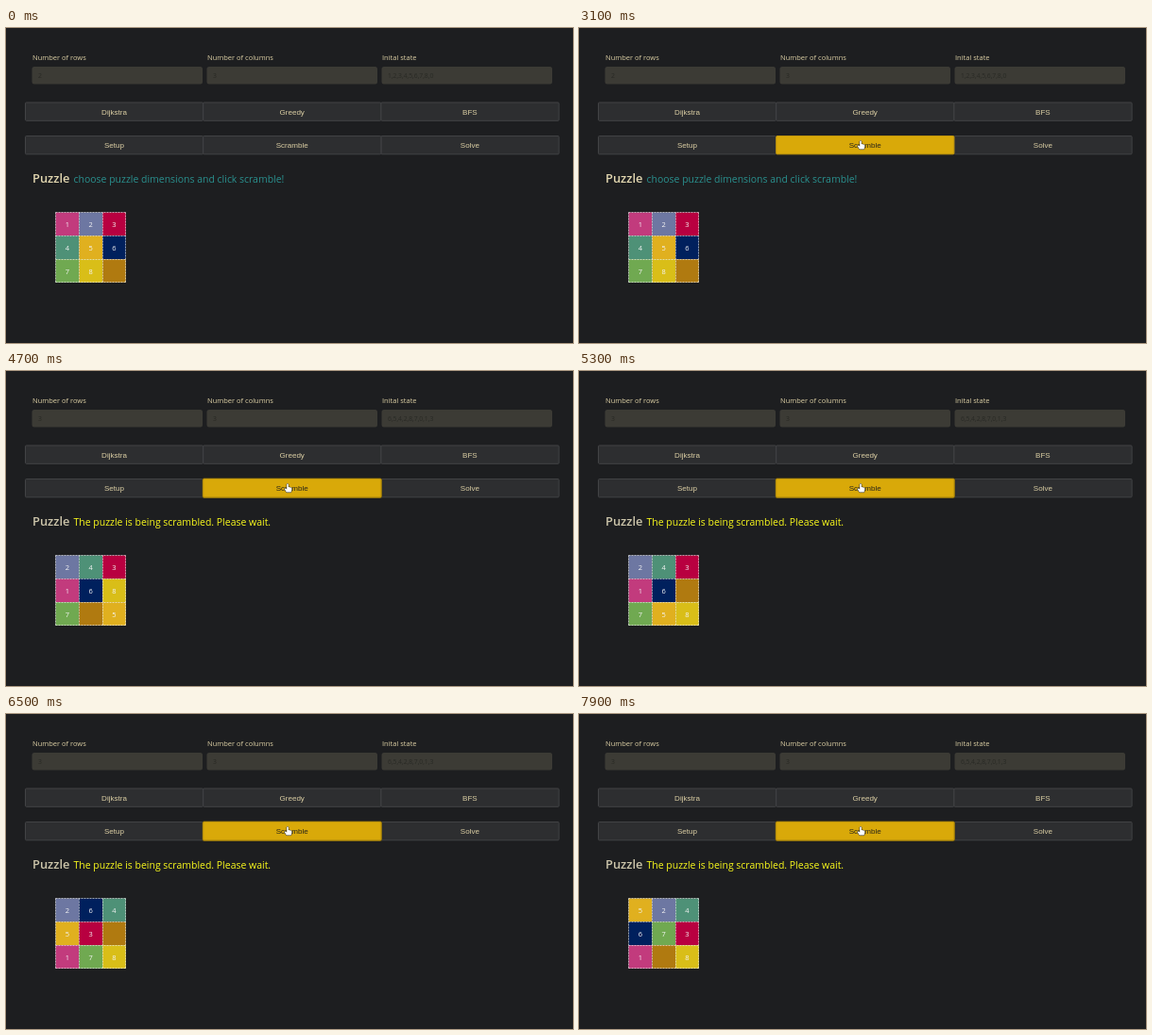
Recreate the animation shown at these times as an HTML page with a canvas. Size 600x334 px, loop 8000 ms.

```html
<!DOCTYPE html>
<html>
<head>
<meta charset="utf-8">
<style>
html, body { margin: 0; width: 600px; height: 334px; overflow: hidden; background: #1d1e20; }
canvas { display: block; }
</style>
</head>
<body>
<canvas id="stage" width="600" height="334"></canvas>
<script>
const ctx = document.getElementById('stage').getContext('2d');
const LOOP = 8000, CLICK = 3300, FIRST_MOVE = 3450, MOVE_GAP = 148;
const SANS = '"Open Sans", "Noto Sans", sans-serif';
const ARIAL = '"Liberation Sans", Arial, sans-serif';
const CREAM = '#dccfa4';

// Index 0 is the gap
const COLORS = ['#b07a10', '#c23b7d', '#6d77a2', '#b80040', '#4e9177',
                '#e0b01f', '#00205d', '#70a951', '#d9be18'];
// Directions the gap travels
const MOVES = 'LULURDRDL' + 'RUDUULD' + 'DLURR' + 'LDULR' + 'ULDRD';
const STEP = { L: -1, R: 1, U: -3, D: 3 };
// Pointer stops: time, x, y
const PATH = [[1250, 531, 338], [1400, 526, 327], [1800, 505, 307], [2600, 298, 119]];

function text(str, x, y, size, color, family = SANS, align = 'left', weight = 400) {
  ctx.font = `${weight} ${size}px ${family}`;
  ctx.textAlign = align;
  ctx.fillStyle = color;
  ctx.fillText(str, x, y);
}

function box(x, y, w, h, r, fill, stroke) {
  ctx.beginPath();
  ctx.roundRect(x, y, w, h, r);
  ctx.fillStyle = fill;
  ctx.fill();
  if (stroke) {
    ctx.strokeStyle = stroke;
    ctx.lineWidth = 1;
    ctx.stroke();
  }
}

function field(x, label, value) {
  text(label, x, 34, 7.5, CREAM);
  box(x - 0.5, 41, 180.5, 18.5, 2.5, '#3c3b35');
  text(value, x + 6, 53, 6.8, '#292a25');
}

function button(col, y, label, hover, focus) {
  const x = 20.5 + col * 188.2;
  if (focus) box(x - 1, y - 1, 190.2, 21.5, 2, '#77600f');
  box(x, y, 188.2, 19.3, 1, hover ? '#d9a909' : '#2d2e30', hover ? '#c1960c' : '#424345');
  text(label, x + 94, y + 12.5, 8.05, hover ? '#29251a' : CREAM, ARIAL, 'center');
}

function boardAt(t) {
  const board = [1, 2, 3, 4, 5, 6, 7, 8, 0];
  const count = Math.max(0, Math.floor((t - FIRST_MOVE) / MOVE_GAP) + 1);
  let gap = 8;
  for (const move of MOVES.slice(0, count)) {
    const next = gap + STEP[move];
    board[gap] = board[next];
    board[next] = 0;
    gap = next;
  }
  return board;
}

function drawBoard(board) {
  const size = 24.8;
  board.forEach((n, i) => {
    const x = 52.5 + i % 3 * size, y = 195.5 + Math.floor(i / 3) * size;
    ctx.fillStyle = COLORS[n];
    ctx.fillRect(x, y, size, size);
    if (n) text(n, x + 12.4, y + 15.6, 7.5, '#f4f4f4', SANS, 'center');
  });
  ctx.strokeStyle = 'rgba(255,255,255,.75)';
  ctx.lineWidth = 0.8;
  ctx.setLineDash([2, 1]);
  ctx.beginPath();
  for (let i = 0; i < 4; i++) {
    const d = Math.round(i * size);
    ctx.moveTo(52.5 + d, 195.5);
    ctx.lineTo(52.5 + d, 269.5);
    ctx.moveTo(52.5, 195.5 + d);
    ctx.lineTo(126.5, 195.5 + d);
  }
  ctx.stroke();
  ctx.setLineDash([]);
}

function pointerAt(t) {
  if (t < PATH[0][0]) return null;
  for (let i = 1; i < PATH.length; i++) {
    const [t0, x0, y0] = PATH[i - 1], [t1, x1, y1] = PATH[i];
    if (t < t1) {
      const k = (t - t0) / (t1 - t0);
      return [x0 + (x1 - x0) * k, y0 + (y1 - y0) * k];
    }
  }
  return PATH[PATH.length - 1].slice(1);
}

const ARROW = new Path2D('M0 0V7.2L1.7 5.7 2.8 8.2 4 7.7 2.9 5.2H5.2Z');
const HAND = new Path2D('M-.8 1Q0-.4.8 1V4L3.6 4.6Q4.6 5 4.4 6.4L3.7 9.6H-1.2L-3.3 6.2Q-3.2 5-2 5.6L-.8 6.6Z');

function drawPointer([x, y], hand) {
  const shape = hand ? HAND : ARROW;
  ctx.save();
  ctx.translate(x, y);
  ctx.strokeStyle = '#1b1b1b';
  ctx.lineWidth = 1;
  ctx.stroke(shape);
  ctx.fillStyle = '#fff';
  ctx.fill(shape);
  ctx.restore();
}

function draw(t) {
  const busy = t >= CLICK;
  const pointer = pointerAt(t);
  const hover = pointer !== null && pointer[1] < 134;

  ctx.fillStyle = '#1d1e20';
  ctx.fillRect(0, 0, 600, 334);

  field(28, 'Number of rows', busy ? '3' : '2');
  field(213, 'Number of columns', '3');
  field(398, 'Inital state', busy ? '6,5,4,2,8,7,0,1,3' : '1,2,3,4,5,6,7,8,0');

  ['Dijkstra', 'Greedy', 'BFS'].forEach((s, i) => button(i, 79, s));
  button(0, 114.5, 'Setup');
  button(2, 114.5, 'Solve');
  button(1, 114.5, 'Scramble', hover, busy);

  text('Puzzle', 28, 164, 12.9, busy ? '#cdc6ab' : '#e2d7b0', SANS, 'left', 600);
  if (busy) text('The puzzle is being scrambled. Please wait.', 71.5, 164, 10.47, '#fbfb1c');
  else text('choose puzzle dimensions and click scramble!', 71.5, 164, 10.47, '#2a918f');

  drawBoard(boardAt(t));
  if (pointer) drawPointer(pointer, hover);
}

const start = performance.now();
function tick() {
  draw((performance.now() - start) % LOOP);
  requestAnimationFrame(tick);
}
tick();
</script>
</body>
</html>
```
